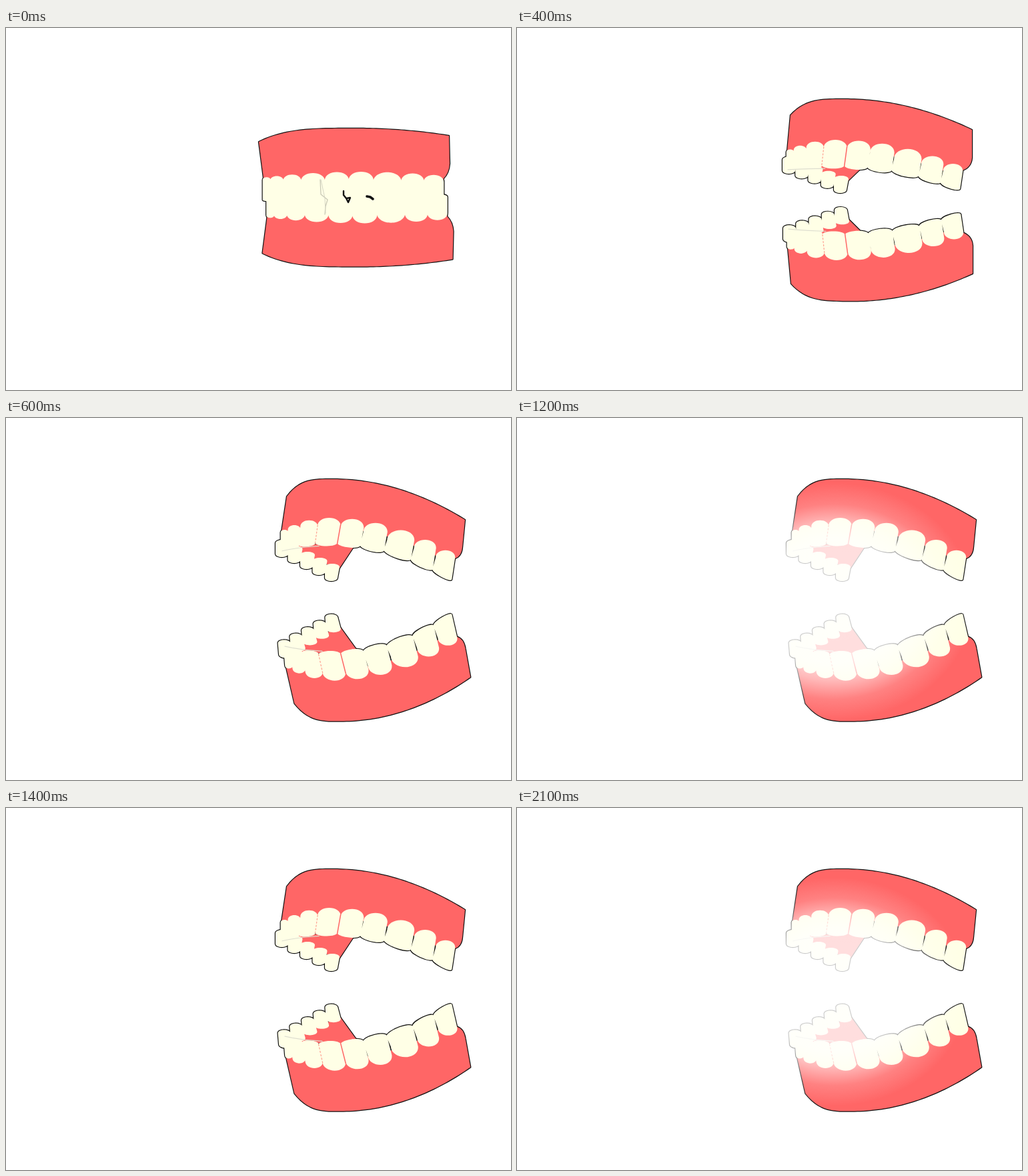
Recreate the animation shown at these times as an HTML page with a canvas. Size 757 by 544 pixels, loop 2300 ms.

```html
<!DOCTYPE html>
<html lang="en">
<head>
<meta charset="utf-8">
<title>Teeth</title>
<style>
html, body { margin: 0; width: 100%; height: 100%; overflow: hidden; background: #fff; }
canvas { display: block; }
</style>
</head>
<body>
<canvas id="stage" width="757" height="544"></canvas>
<script>
const ctx = document.getElementById('stage').getContext('2d');
const PINK = '#ff6666', CREAM = '#ffffe6', GREY = '#deded0', INK = '#111';
const LOOP = 2300;
const WIDTHS = [11, 19, 26, 35, 35, 36, 41, 33, 29];
const TOTAL = WIDTHS.reduce((a, b) => a + b);
const BACK_TEETH = 5;

// gum, root and tip are arcs: left end, peak, right end.
// back: first and last rear tooth; flip: matrix from upper to lower jaw.
const closed = {
  gum: [[379, 171], [525, 151], [664, 162]],
  root: [[385, 225], [527, 216], [656, 222]],
  tip: [[386, 260], [525, 260], [656, 260]],
  side: [664, 218], back: [[412, 233], [470, 233]],
  lean: 0, seam: 0, flip: [1, 0, 0, -1, 5.5, 509.5]
};
const half = {
  gum: [[410, 131], [490, 107], [682, 153]],
  root: [[404, 185], [476, 168], [668, 210]],
  tip: [[403, 213], [470, 211], [668, 246]],
  side: [681, 209], back: [[409, 193], [486, 222]],
  lean: 4, seam: 1, flip: [1, 0.025, 0, -1, 1, 505]
};
const open = {
  gum: [[421, 118], [490, 92], [688, 153]],
  root: [[412, 171], [485, 150], [673, 207]],
  tip: [[411, 200], [480, 192], [673, 247]],
  side: [683, 208], back: [[415, 183], [489, 219]],
  lean: 5, seam: 1, flip: [1, -0.01, -0.09, -1.05, 22, 557]
};

function mix(a, b, t) {
  if (typeof a === 'number') return a + (b - a) * t;
  if (Array.isArray(a)) return a.map((v, i) => mix(v, b[i], t));
  return Object.fromEntries(Object.keys(a).map(k => [k, mix(a[k], b[k], t)]));
}

// Height of a two-sided power curve with its peak at p.
const arc = ([l, p, r], power = 2) => x => {
  const left = x < p[0], end = left ? l : r;
  const u = Math.abs((x - p[0]) / (end[0] - p[0]));
  return p[1] + (end[1] - p[1]) * u ** (left ? power : 2);
};

function addTooth(path, x0, x1, top, dome, lean0, lean1, tip0, tip1, round) {
  const a = x0 - lean0, b = x1 - lean1;
  path.moveTo(x0, top + dome);
  path.bezierCurveTo(x0, top - dome / 3, x1, top - dome / 3, x1, top + dome);
  path.lineTo(b, tip1 - round);
  path.bezierCurveTo(b, tip1 + round / 3, a, tip0 + round / 3, a, tip0 - round);
  path.closePath();
}

function gumPath({ gum, root, side }) {
  const path = new Path2D(), y = arc(gum, 3.6), low = arc(root);
  const [l, , r] = gum, [rl, , rr] = root, steps = 60;
  path.moveTo(rl[0] + 1, rl[1]);
  for (let i = 0; i <= steps; i++) {
    const x = mix(l[0], r[0], i / steps);
    path.lineTo(x, y(x));
  }
  path.lineTo(side[0] + 1, side[1] - 14);
  path.quadraticCurveTo(side[0], side[1], rr[0], rr[1] + 4);
  for (let i = 0; i <= steps; i++) {
    const x = mix(rr[0] - 3, rl[0] + 3, i / steps);
    path.lineTo(x, low(x) + 16);
  }
  path.closePath();
  return path;
}

function build(pose) {
  const root = arc(pose.root), tip = arc(pose.tip);
  const left = pose.root[0][0], scale = (pose.root[2][0] - left) / TOTAL;
  const front = new Path2D(), rear = new Path2D(), mouth = new Path2D();
  const lean = i => pose.lean * Math.min(1, i / 4);
  const bounds = [left];
  WIDTHS.forEach((w, i) => {
    const a = bounds[i], b = a + w * scale;
    bounds.push(b);
    addTooth(front, a - 0.3, b + 0.3, root((a + b) / 2), w * 0.37,
      lean(i), lean(i + 1), tip(a), tip(b), w * 0.16);
  });
  const [first, last] = pose.back;
  for (let i = 0; i < BACK_TEETH; i++) {
    const [x, y] = mix(first, last, i / (BACK_TEETH - 1));
    addTooth(rear, x - 11, x + 11, y, 5, 0, 3, y + 26, y + 26, 5);
  }
  const inner = mix(bounds[4], bounds[5], 0.55);
  mouth.moveTo(left + 12, tip(left) - 8);
  mouth.lineTo(inner, tip(inner) - 8);
  mouth.lineTo(inner, tip(inner));
  mouth.lineTo(last[0] + 10, last[1] + 8);
  mouth.lineTo(first[0], first[1] + 10);
  mouth.closePath();
  return { pose, root, tip, bounds, lean, front, rear, mouth, gum: gumPath(pose) };
}

function line(pts, color, width, dash = []) {
  ctx.beginPath();
  for (const p of pts) ctx.lineTo(...p);
  ctx.strokeStyle = color;
  ctx.lineWidth = width;
  ctx.setLineDash(dash);
  ctx.stroke();
  ctx.setLineDash([]);
}

function fill(path, color) {
  ctx.fillStyle = color;
  ctx.fill(path);
}

// Layers are shared by both jaws so that only the joint silhouette keeps its line.
const layers = [
  jaw => {
    ctx.strokeStyle = INK;
    ctx.lineWidth = 2.4;
    for (const part of ['gum', 'mouth', 'rear', 'front']) ctx.stroke(jaw[part]);
  },
  jaw => {
    fill(jaw.gum, PINK);
    fill(jaw.mouth, PINK);
    fill(jaw.rear, CREAM);
  },
  jaw => fill(jaw.front, CREAM),
  ({ pose, root, tip, bounds, lean }) => {
    const seam = i => [[bounds[i], root(bounds[i]) + 10], [bounds[i] - lean(i), tip(bounds[i]) - 4]];
    ctx.globalAlpha = pose.seam;
    line(bounds.slice(0, 4).map(x => [x + 2, tip(x)]), GREY, 1.2);
    line(seam(3), '#ffa090', 1.2, [2, 3]);
    line(seam(4), PINK, 1.5);
    ctx.globalAlpha = 1;
  }
];

function drawJaws(jaw) {
  for (const layer of layers) {
    layer(jaw);
    ctx.save();
    ctx.transform(...jaw.pose.flip);
    layer(jaw);
    ctx.restore();
  }
}

function drawCracks() {
  line([[471, 228], [472, 250], [482, 258], [479, 268], [478, 280]], '#c9c9b6', 1.3);
  line([[472, 228], [478, 256], [479, 278]], '#d6d6c4', 1);
  line([[506, 245], [506, 251], [510, 256], [513, 262], [516, 255], [510, 256]], INK, 2.4);
  line([[541, 253], [546, 254], [550, 257]], INK, 3.6);
}

function glow(x, y, rx, ry, stops) {
  ctx.save();
  ctx.translate(x, y);
  ctx.scale(rx, ry);
  const g = ctx.createRadialGradient(0, 0, 0, 0, 0, 1);
  for (const [at, a] of stops) g.addColorStop(at, `rgba(255,255,255,${a})`);
  ctx.fillStyle = g;
  ctx.fillRect(-1, -1, 2, 2);
  ctx.restore();
}

const soft = () => glow(470, 282, 150, 122, [[0, 0.56], [0.35, 0.42], [0.7, 0.16], [1, 0]]);
const strong = k => glow(474, 276, 202 * k, 172 * k,
  [[0, 0.8], [0.52, 0.78], [0.66, 0.55], [0.82, 0.18], [1, 0]]);

const shut = build(closed), ajar = build(mix(closed, half, 0.42));
const parted = build(half), wide = build(open);

const scenes = [
  { start: 0, jaw: shut, extra: drawCracks },
  { start: 200, jaw: ajar },
  { start: 400, jaw: parted },
  { start: 600, jaw: wide },
  { start: 1000, jaw: wide, extra: soft },
  { start: 1200, jaw: wide, extra: () => strong(1.04) },
  { start: 1400, jaw: wide },
  { start: 1900, jaw: wide, extra: soft },
  { start: 2100, jaw: wide, extra: () => strong(1) }
];

ctx.lineJoin = ctx.lineCap = 'round';

function tick() {
  const t = performance.now() % LOOP;
  const { jaw, extra } = scenes.filter(s => s.start <= t).pop();
  ctx.fillStyle = '#fff';
  ctx.fillRect(0, 0, 757, 544);
  drawJaws(jaw);
  if (extra) extra();
  requestAnimationFrame(tick);
}
tick();
</script>
</body>
</html>
```
